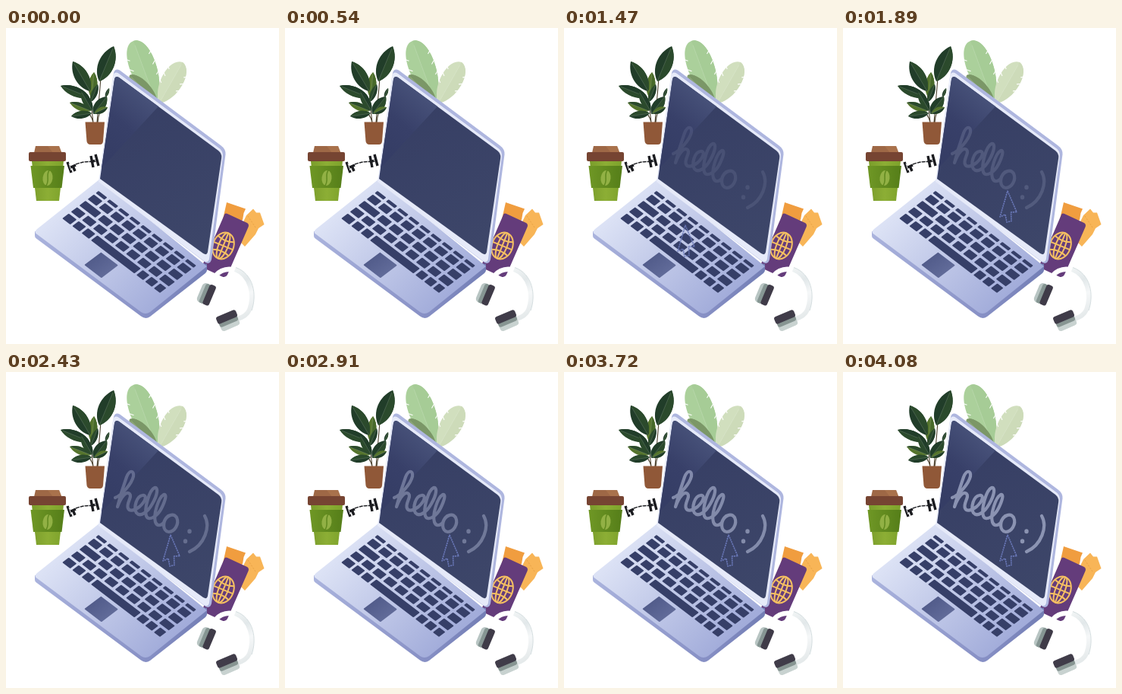
Animation of 360x415 px, one loop 4.11 s. Source, as an HTML page:

```html
<!DOCTYPE html>
<html lang="en">
<head>
<meta charset="utf-8">
<title>Hello laptop</title>
<style>
html, body { margin: 0; width: 100%; height: 100%; overflow: hidden; background: #fff; }
svg { display: block; width: 360px; height: 415px; }
</style>
</head>
<body>
<svg viewBox="0 0 360 415" xmlns="http://www.w3.org/2000/svg">
  <defs>
    <linearGradient id="deck" gradientUnits="userSpaceOnUse" x1="85" y1="225" x2="215" y2="355">
      <stop offset="0" stop-color="#dce2f5"/><stop offset="1" stop-color="#a2acda"/>
    </linearGradient>
    <linearGradient id="side" gradientUnits="userSpaceOnUse" x1="38" y1="0" x2="265" y2="0">
      <stop offset="0" stop-color="#aab3dd"/><stop offset=".64" stop-color="#8790c5"/><stop offset="1" stop-color="#737eb5"/>
    </linearGradient>
    <linearGradient id="screen" gradientUnits="userSpaceOnUse" x1="140" y1="90" x2="265" y2="280">
      <stop offset="0" stop-color="#363e64"/><stop offset="1" stop-color="#3d4669"/>
    </linearGradient>
    <linearGradient id="glare" gradientUnits="userSpaceOnUse" x1="132" y1="165" x2="190" y2="98">
      <stop offset="0" stop-color="#353d65"/><stop offset=".5" stop-color="#384069"/><stop offset="1" stop-color="#465078"/>
    </linearGradient>
    <linearGradient id="pad" x1="0" y1="0" x2="1" y2="0">
      <stop offset="0" stop-color="#525c8b"/><stop offset="1" stop-color="#616b99"/>
    </linearGradient>
    <linearGradient id="cup" x1="0" y1="0" x2="1" y2="0">
      <stop offset="0" stop-color="#7a9d2b"/><stop offset=".5" stop-color="#8cae35"/><stop offset="1" stop-color="#7da22b"/>
    </linearGradient>
    <linearGradient id="sleeve" x1="0" y1="0" x2="1" y2="0">
      <stop offset="0" stop-color="#6f9725"/><stop offset="1" stop-color="#557e19"/>
    </linearGradient>
    <linearGradient id="band" gradientUnits="userSpaceOnUse" x1="290" y1="315" x2="322" y2="380">
      <stop offset="0" stop-color="#f5f8f8"/><stop offset=".35" stop-color="#e2e8ea"/>
      <stop offset=".6" stop-color="#f5f7f8"/><stop offset="1" stop-color="#e3e8e9"/>
    </linearGradient>
  </defs>

  <g id="backLeaves"></g>

  <g id="plant">
    <path d="M115 124Q112 100 111 80M120 124Q123 88 125 66M115 124Q112 112 104 108M121 124Q122 110 130 98" fill="none" stroke="#4d4330" stroke-width="1.1"/>
    <g id="leaves"></g>
    <path d="M104.500 123.500H130L128 149Q127.500 153 124 153H111Q107.500 153 106.500 149Z" fill="#905838"/>
  </g>

  <g id="coffee">
    <path d="M34 175H76L70 227H40Z" fill="url(#cup)"/>
    <path d="M32.500 181H77L73.500 210H36Z" fill="url(#sleeve)"/>
    <path d="M39 155H70L73.500 164H37Z" fill="#9e6846"/>
    <path d="M55 155H70L73.500 164H62Z" fill="#b07950" opacity=".6"/>
    <rect x="30" y="163" width="49" height="12" rx="2" fill="#764432"/>
    <g transform="rotate(8 55 197)">
      <ellipse cx="55" cy="197" rx="6.500" ry="10" fill="#92b145"/>
      <path d="M56 186C51 193 59 199 54 208" fill="none" stroke="#61891f" stroke-width="1.500"/>
    </g>
  </g>

  <g id="dumbbell" fill="none" stroke="#1b1c20">
    <path d="M92 179Q102 175 112 175.500" stroke-width="1.400" stroke-dasharray="5 1"/>
    <path d="M81 176L86 190M88 181L91 188M112 168L115 183M118 166L122 181" stroke-width="3.400"/>
    <path d="M83 184L92 180M112 176L121 173" stroke-width="3.400"/>
    <path d="M83 178L86 187M116 168L118 175" stroke="#e4e5e7" stroke-width="1"/>
  </g>

  <g id="travel">
    <path d="M291 229L316 237.500L313.500 243L312 252L300 262L286 251Z" fill="#f09d3f"/>
    <path d="M317 246L326 237.500L330 242.500L335 242.500L340.500 258L333 263L329 271L315 287L303 275Z" fill="#f8b557"/>
    <path d="M319 247L329 262" stroke="#e6a044" stroke-dasharray="2 2"/>
    <path d="M288.500 244Q290 243 292 244L318 256Q321 258 319.500 261.500L292 324Q289.500 328.500 285 326.500L258 314Z" fill="#643c7b"/>
    <g fill="none" stroke="#f5c062" stroke-width="2" transform="rotate(22 286.500 286)">
      <ellipse cx="286.500" cy="286" rx="13.600" ry="18"/>
      <ellipse cx="286.500" cy="286" rx="6.300" ry="18"/>
      <path d="M286.500 268V304M273 286H300M275.500 276.500Q286.500 281 297.500 276.500M275.500 295.500Q286.500 291 297.500 295.500"/>
    </g>
  </g>

  <g id="headphones">
    <path d="M272 334C277 319 290 314 303 318C323 326 328 351 321 370Q317 379 304 382" fill="none" stroke="#fff" stroke-width="6.500"/>
    <path d="M302 317C323 325 328 351 321 370Q317 379 305 382" fill="none" stroke="url(#band)" stroke-width="6"/>
    <path d="M303 314.500C327 323 331 351 324 371" fill="none" stroke="#d5dee0" stroke-width="1"/>
    <g transform="rotate(23 264 349)">
      <rect x="255" y="336" width="11" height="27" rx="5" fill="#b8c5c3"/>
      <rect x="259" y="336" width="7" height="27" rx="3" fill="#869693"/>
      <rect x="264" y="335" width="9" height="28" rx="3" fill="#3f3b48"/>
    </g>
    <g transform="rotate(-23 293 384)">
      <rect x="280" y="382" width="26" height="13" rx="4" fill="#c8d2d0"/>
      <rect x="280" y="381" width="26" height="8" rx="3" fill="#879592"/>
      <rect x="279" y="374" width="28" height="10" rx="3" fill="#403c49"/>
    </g>
  </g>

  <g id="laptop">
    <path d="M38 267V273Q38 275 40 276.500L178 378.500Q184 383 190 379L263 322Q265 320 265 318V310Z" fill="url(#side)"/>
    <path d="M123 199L41 264Q36 268 41 271L178 373Q184 377 190 373L265 313Z" fill="url(#deck)"/>
    <g id="keys" transform="matrix(.806 .6125 -.817 .617 122 214)"></g>
    <path d="M142 59Q144 52.500 150 55.500L283 154Q290 159 289.500 166L271 304Q269 311 263 308L123 202Z" fill="#aeb6df"/>
    <path d="M141 63Q143 56 149 60L280 157Q286.500 161 286 168.500L268 303Q267 309 261 306L122 202Z" fill="#e6eaf9"/>
    <path d="M143 67.500Q144 62 149 65L280 161Q285 165 284.200 170.500L266 294Q265 299 260 296L124 198Z" fill="url(#screen)"/>
    <path d="M143 67.500Q144 62 149 65L201 103L126 184Z" fill="url(#glare)"/>
  </g>

  <g id="hello" fill="none" stroke="#b0b8d4" stroke-width="4.200" stroke-linecap="round" stroke-linejoin="round" opacity="0">
    <path d="M144 165C153 162 166 146 168 137C169 129 163 128 159 138C155 149 150 165 147 177C152 163 159 156 163 160C167 164 158 173 161 179C163 184 171 181 176 177C185 169 186 161 180 162C172 163 168 178 172 185C177 191 187 184 193 173C200 161 201 151 196 152C189 155 182 179 185 189C188 197 200 189 205 179C211 167 212 160 208 161C201 165 194 187 197 197C199 203 204 202 208 198C211 189 220 184 225 191C229 200 222 210 214.500 210C206 209 206 195 214 189"/>
    <path d="M262 189C270 203 262 227 242 236"/>
    <path d="M242 209V209.500M236.500 222V222.500" stroke-width="5.400"/>
  </g>

  <path id="cursor" d="M217 214L229 241.500L221.500 242L222 253.500L216 255L214 245L207 248Z" fill="none" stroke="#6a78b8" stroke-width="1.600" stroke-dasharray="2.200 .8" stroke-linejoin="round" opacity="0"/>
</svg>
<script>
const LOOP = 4110;
const byId = id => document.getElementById(id);

// A leaf from base to tip, one half shaded; a larger "full" makes the tip blunter.
function leaf([x1, y1, x2, y2, w, fill, shade, full = .72, slits = 0]) {
  const dx = x2 - x1, dy = y2 - y1, len = Math.hypot(dx, dy);
  const nx = -dy / len, ny = dx / len;
  const at = (t, off) => `${(x1 + dx * t + nx * off).toFixed(1)} ${(y1 + dy * t + ny * off).toFixed(1)}`;
  const edge = s => `C${at(.25, s * w * .66)} ${at(full, s * w * .66)} ${x2} ${y2}`;
  const start = `M${x1} ${y1}`;
  let out = `<path d="${start}${edge(1)}${start}${edge(-1)}" fill="${fill}"/>` +
    `<path d="${start}${edge(1)}Z" fill="${shade}"/>` +
    `<path d="${start}L${at(.93, 0)}" stroke="#fff" stroke-width=".6" opacity=".25"/>`;
  for (let i = 0; i < slits; i++) {
    const t = .4 + i * .5 / slits;
    for (const s of [1, -1])
      out += `<path d="M${at(t + .06, s * w * .56)}L${at(t, s * w * .38)}" stroke="#fff" stroke-width="1.1"/>`;
  }
  return out;
}

const dark = "#213d29", mid = "#2b4a2c", olive = "#56752d";
byId("backLeaves").innerHTML = [
  [198, 98, 168, 17, 35, "#abd09b", "#a6cc96", 1, 3],
  [202, 99, 233, 45, 29, "#d1dfbe", "#cddbb9", .95, 3],
  [200, 100, 163, 62, 19, "#86a06f", "#7b9767", .9]
].map(leaf).join("");

byId("leaves").innerHTML = [
  [113, 92, 116, 58, 12, olive, "#486a2a"],
  [123, 70, 142, 24, 21, dark, mid],
  [111, 83, 88, 44, 18, dark, mid],
  [110, 91, 72, 76, 13, mid, dark],
  [112, 109, 84, 98, 10, olive, mid],
  [113, 112, 86, 116, 10, dark, mid],
  [114, 109, 99, 83, 11, mid, dark],
  [115, 113, 133, 90, 14, dark, mid],
  [117, 112, 134, 104, 8, olive, dark],
  [112, 97, 121, 74, 8, mid, dark],
  [131, 91, 136, 79, 4, dark, mid]
].map(leaf).join("");

// Keyboard in deck coordinates: x runs along a row, y towards the user.
const key = (x, y, w, h, fill = "#363f68") =>
  `<rect x="${x}" y="${y}" width="${w}" height="${h}" rx="1" fill="${fill}"/>`;
function row(y, h, widths, gap = 4) {
  let x = 0;
  return widths.map(w => {
    const k = key(x, y, w, h);
    x += w + gap;
    return k;
  }).join("");
}
const even = n => Array(n).fill((160 - (n - 1) * 4) / n);
byId("keys").innerHTML =
  row(0, 4.5, even(9)) +
  row(7.5, 10, even(9)) +
  row(21, 10, [26, ...Array(7).fill(15.14)]) +
  row(34.5, 10, [14, ...Array(7).fill(14), 16]) +
  row(48, 10.5, [13, 12, 12, 71, 11, 11, 10], 3.3) +
  key(68, 63, 28, 27, "url(#pad)");

function play(id, steps) {
  byId(id).animate(
    steps.map(([ms, frame, easing = "linear"]) => ({ offset: ms / LOOP, easing, ...frame })),
    { duration: LOOP, iterations: Infinity });
}

play("hello", [
  [0, 0], [810, 0], [1080, .07], [1890, .2], [2430, .36], [3390, .56], [4080, .69], [LOOP, .7]
].map(([ms, opacity]) => [ms, { opacity }]));

const away = { transform: "translate(-134px, 106px)" };
const home = { transform: "translate(0px, 0px)" };
play("cursor", [
  [0, { opacity: 0, ...away }],
  [840, { opacity: 0, ...away }],
  [1050, { opacity: 1, ...away }],
  [1080, { opacity: 1, ...away }, "ease-in-out"],
  [1800, { opacity: 1, ...home }],
  [LOOP, { opacity: 1, ...home }]
]);
</script>
</body>
</html>
```
